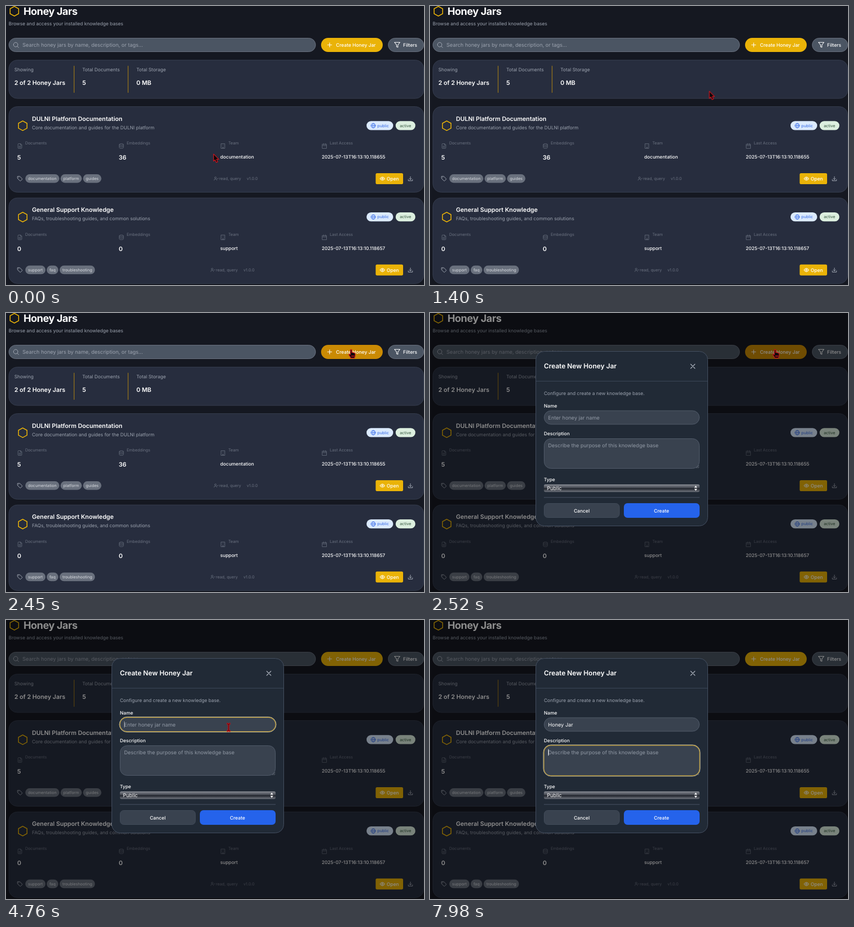
Animation, 800 px wide and 534 px high, one loop 8000 ms. Source, as an HTML page:

```html
<!DOCTYPE html>
<html lang="en">
<head>
<meta charset="utf-8">
<title>Honey Jars</title>
<style>
html, body { margin: 0; width: 100%; height: 100%; overflow: hidden; background: #151821; }
svg { position: absolute; left: 0; top: 0; overflow: visible; }
text, #typed { font-family: Inter, Roboto, sans-serif; text-rendering: geometricPrecision; white-space: pre; }
text { fill: #fff; font-size: 9px; }
.xs { font-size: 7.7px; }
.md { font-size: 9.85px; }
.lg { font-size: 11.5px; font-weight: 600; }
.h1 { font-size: 19.5px; font-weight: 700; letter-spacing: -.48px; }
.h2 { font-size: 12.85px; font-weight: 600; }
.btn { font-size: 9.15px; font-weight: 500; }
.mid { font-weight: 500; }
.soft { fill: #9ca3af; }
.dim { fill: #6b7280; }
.hint { fill: #929aa6; }
.tag { fill: #d8dbe0; }
.center { text-anchor: middle; }
.panel { fill: #272d3e; stroke: #363d4e; }
.pill { fill: #69707d; }
.field { fill: #4b5563; stroke: #6b7280; }
.input { fill: #39424f; stroke: #525c6b; }
.gold { fill: #eab308; }
.icon { fill: none; stroke-linecap: round; stroke-linejoin: round; }
.hex { stroke: #eab308; stroke-width: 1.6; }
.line { stroke: #646b7a; stroke-width: .9; }
.pale { stroke: #a7adb8; stroke-width: 1; }
.white { stroke: #fff; stroke-width: 1.1; }
.halo { fill: none; stroke: #a9b2c0; stroke-width: 1; }
.ring { fill: none; stroke: #d0a730; stroke-width: 1.2; }

#page, #modal, #typed, #typed::before, #typed::after, #hint, .focus, .cursor, #move, #create {
  animation: 8s step-end infinite;
}
#page { animation-name: dim; }
#modal { animation-name: open; }
#create { animation-name: hover; animation-timing-function: linear; }
#move { animation-name: move; }
#arrow { animation-name: arrow; }
#hand { animation-name: hand; }
#beam { animation-name: beam; }
#hint { animation-name: hint; }
#nameFocus { animation-name: nameFocus; }
#textFocus { animation-name: textFocus; }

#typed { position: absolute; left: 226px; top: 193.5px; height: 14px; line-height: 14px; font-size: 9.85px; color: #fff; }
#typed::before { content: ""; animation-name: type; }
#typed::after {
  content: ""; display: inline-block; width: 1.1px; height: 12px; margin-left: .2px;
  vertical-align: -2.2px; background: #fff; opacity: 0; animation-name: blink;
}

@keyframes dim {
  0% { filter: none; }
  31.5%, 100% { filter: brightness(.55); }
}
@keyframes open { 0% { visibility: hidden; } 31.5%, 100% { visibility: visible; } }
@keyframes hover {
  0%, 24.375% { fill: #eab308; }
  26.875%, 32.375% { fill: #ca8a04; }
  33.25%, 100% { fill: #eab308; }
}
@keyframes move {
  0%, 10.5% { transform: translate(397px, 283px); animation-timing-function: cubic-bezier(.4, .1, .8, .8); }
  17.5% { transform: translate(534px, 163px); animation-timing-function: cubic-bezier(.2, .4, .4, 1); }
  27.125%, 37.625% { transform: translate(660.5px, 71px); animation-timing-function: cubic-bezier(.4, 0, .45, 1); }
  47.25%, 100% { transform: translate(426px, 205.5px); }
}
@keyframes arrow {
  0% { visibility: visible; }
  24.375% { visibility: hidden; }
  32.375% { visibility: visible; }
  44.5%, 100% { visibility: hidden; }
}
@keyframes hand { 0% { visibility: hidden; } 24.375% { visibility: visible; } 32.375%, 100% { visibility: hidden; } }
@keyframes beam { 0% { visibility: hidden; } 44.5% { visibility: visible; } 67.375%, 100% { visibility: hidden; } }
@keyframes hint { 0% { opacity: 1; } 67.375%, 100% { opacity: 0; } }
@keyframes nameFocus { 0% { opacity: 0; } 51.625% { opacity: 1; } 99.75%, 100% { opacity: 0; } }
@keyframes textFocus { 0% { opacity: 0; } 99.75%, 100% { opacity: 1; } }
@keyframes type {
  0% { content: ""; }
  67.375% { content: "H"; }
  70% { content: "Ho"; }
  71.75% { content: "Hon"; }
  74.375% { content: "Hone"; }
  77.875% { content: "Honey"; }
  80.5% { content: "Honey "; }
  90.125% { content: "Honey J"; }
  92.75% { content: "Honey Ja"; }
  96.25%, 100% { content: "Honey Jar"; }
}
@keyframes blink {
  0% { opacity: 0; }
  51.625% { opacity: 1; }
  59.5% { opacity: .5; }
  60.375% { opacity: 0; }
  63.875% { opacity: .3; }
  64.75% { opacity: .65; }
  65.625% { opacity: 1; }
  87.5% { opacity: .5; }
  88.375% { opacity: 0; }
  90.125% { opacity: 1; }
  99.75%, 100% { opacity: 0; }
}
</style>
</head>
<body>
<svg id="page" width="800" height="534" viewBox="0 0 800 534">
  <defs>
    <path id="hex" class="icon hex" d="M0-9.2 8.2-4.7V4.7L0 9.2-8.2 4.7V-4.7Z"/>
    <path id="doc" class="icon line" d="M1-4.5H-2.6Q-3.6-4.5-3.6-3.5V3.5Q-3.6 4.5-2.6 4.5H2.6Q3.6 4.5 3.6 3.5V-2ZL1-2H3.6M-1.8 .3H1.8M-1.8 2.3H1.8"/>
    <path id="base" class="icon line" d="M-4-3A4 1.5 0 0 1 4-3 4 1.5 0 0 1-4-3V3A4 1.5 0 0 0 4 3V-3M-4 0A4 1.5 0 0 0 4 0"/>
    <path id="house" class="icon line" d="M-3.5-4.5H3.5V4.5H-3.5ZM-1 4.5V2.5H1V4.5M-1.5-2.5H-1.4M1.4-2.5H1.5M-1.5 0H-1.4M1.4 0H1.5"/>
    <path id="day" class="icon line" d="M-4-3.4H4V4.5H-4ZM-4-.8H4M-1.8-4.8V-2.4M1.8-4.8V-2.4"/>
    <path id="label" class="icon pale" d="M-4.2-4.2H-.2L4.2 .2Q4.8 .9 4.2 1.5L1.4 4.3Q.8 4.8 .1 4.3L-4.2 0ZM-2.2-2.2H-2.1"/>
    <path id="user" class="icon line" d="M-3.8 3.2Q-3.8 .8-1 .8T1.6 3.2M-2.7-1.6A1.6 1.6 0 0 1 .5-1.6 1.6 1.6 0 0 1-2.7-1.6M2 0 2.9 .9 4.3-.7"/>
    <path id="save" class="icon pale" d="M0-4V1.8M-2.2-.4 0 1.8 2.2-.4M-4 1.5V4H4V1.5"/>
    <g id="eye" class="icon white"><path d="M-4.5 0Q0-6.6 4.5 0 0 6.6-4.5 0Z"/><circle r="1.4"/></g>
    <g id="globe" class="icon" stroke="#3b6fe8" stroke-width=".9"><circle r="4.4"/><ellipse rx="1.9" ry="4.4"/><path d="M-4.4 0H4.4"/></g>
  </defs>
  <rect width="800" height="534" fill="#151821"/>
  <use href="#hex" x="16" y="10"/>
  <text class="h1" x="33.5" y="17">Honey Jars</text>
  <text class="soft" x="5" y="37.2">Browse and access your installed knowledge bases</text>

  <rect class="field" x="5.5" y="61.5" width="587" height="26" rx="13"/>
  <path class="icon pale" d="M14.3 74A4.2 4.2 0 0 1 22.7 74 4.2 4.2 0 0 1 14.3 74M21.5 77 24.3 79.8"/>
  <text class="md soft" x="31.5" y="78.4">Search honey jars by name, description, or tags...</text>
  <rect id="create" x="603" y="61" width="118" height="27" rx="13.5"/>
  <path class="icon white" d="M615.5 74.5H623.5M619.5 70.5V78.5"/>
  <text class="btn" x="631.5" y="78">Create Honey Jar</text>
  <rect class="field" x="731.5" y="61.5" width="68" height="26" rx="13"/>
  <path class="icon white" d="M743.5 69.5H754L750 74.5V79L747.5 78V74.5Z"/>
  <text class="btn" x="760" y="78">Filters</text>

  <rect class="panel" x="5.5" y="103.5" width="794" height="73.5" rx="16"/>
  <path stroke="#b98a12" d="M130.3 114.5V166M233.7 114.5V166"/>
  <text class="soft" x="16" y="125">Showing</text>
  <text class="lg" x="16" y="151.2">2 of 2 Honey Jars</text>
  <text class="soft" x="146" y="125">Total Documents</text>
  <text class="lg" x="146" y="151.2">5</text>
  <text class="soft" x="249.5" y="125">Total Storage</text>
  <text class="lg" x="249.5" y="151.2">0 MB</text>
  <g id="cards"></g>
</svg>

<div id="modal">
  <svg width="800" height="534" viewBox="0 0 800 534">
    <defs>
      <linearGradient id="metal" x2="0" y2="1">
        <stop stop-color="#858991"/><stop offset=".42" stop-color="#4b4f58"/>
        <stop offset=".55" stop-color="#20242c"/><stop offset="1" stop-color="#747881"/>
      </linearGradient>
    </defs>
    <rect x="202.5" y="73.5" width="329" height="334" rx="16" fill="#212a36" stroke="#465163"/>
    <path stroke="#3c4859" d="M203 130.5H531"/>
    <path stroke="#4a5566" d="M218 353H516"/>
    <text class="h2" x="218" y="106.2">Create New Honey Jar</text>
    <path class="icon" stroke="#b4bac5" stroke-width="1.2" d="M499 98 507 106M507 98 499 106"/>
    <text class="soft" x="218" y="157">Configure and create a new knowledge base.</text>
    <text class="mid" x="218" y="180.5">Name</text>
    <rect class="input" x="218.5" y="187" width="297" height="26" rx="13"/>
    <text id="hint" class="md hint" x="226" y="203.8">Enter honey jar name</text>
    <text class="mid" x="218" y="234.2">Description</text>
    <rect class="input" x="218.5" y="240.5" width="297" height="57" rx="13"/>
    <text class="md hint" x="226" y="257.3">Describe the purpose of this knowledge base</text>
    <path stroke="#9aa1ac" stroke-width=".7" d="M509.5 297 515 291.5M512.5 297 515 294.5"/>
    <text class="mid" x="218" y="321.8">Type</text>
    <rect x="218" y="328" width="298" height="14.5" rx="3" fill="url(#metal)"/>
    <text class="md" x="223.7" y="338.8">Public</text>
    <path fill="#fff" d="M505.8 334.2 508.6 330.4 511.4 334.2ZM505.8 336.4 508.6 340.2 511.4 336.4Z"/>
    <rect x="218.5" y="364.5" width="144" height="27" rx="7" fill="#39424f" stroke="#424c5a"/>
    <text class="btn center" x="290.3" y="381.6">Cancel</text>
    <rect x="371" y="364" width="145" height="28" rx="7" fill="#2563eb"/>
    <text class="btn center" x="443" y="381.6">Create</text>
    <g id="nameFocus" class="focus">
      <rect class="halo" x="216.9" y="185.4" width="300.2" height="29.2" rx="14.6"/>
      <rect class="ring" x="217.9" y="186.4" width="298.2" height="27.2" rx="13.6"/>
    </g>
    <g id="textFocus" class="focus">
      <rect class="halo" x="216.9" y="238.9" width="300.2" height="60.2" rx="14.6"/>
      <rect class="ring" x="217.9" y="239.9" width="298.2" height="58.2" rx="13.6"/>
      <rect x="226.2" y="247.5" width="1.1" height="12" fill="#fff"/>
    </g>
  </svg>
  <div id="typed"></div>
</div>

<svg width="800" height="534" viewBox="0 0 800 534">
  <g id="move" fill="#08090c" stroke="#d8141c" stroke-width="1.2" stroke-linejoin="round">
    <path id="arrow" class="cursor" d="M.3 .3V14L3.2 11.4 5.5 16.4 8.2 15.2 5.9 10.3H10.2Z"/>
    <path id="hand" class="cursor" d="M-1.3-.3Q0-1.8 1.3-.3V4.6Q2.5 3.8 3.6 5 4.8 4.4 5.8 5.6 7.4 5.2 7.7 7V10.5Q7.2 13 6.3 15.4H-.8Q-1.4 12.8-3.8 9.8-4.6 7.8-3 7.7-2 7.8-1.3 9ZM1.2 10V13M3.2 10V13M5.2 10V13"/>
    <g id="beam" class="cursor" fill="none">
      <path stroke-width="3" d="M-3.5-7Q-.2-7 0-5 .2-7 3.5-7M0-5V5M-3.5 7Q-.2 7 0 5 .2 7 3.5 7"/>
      <path stroke="#240407" stroke-width=".9" d="M-3-7Q-.2-7 0-5 .2-7 3-7M0-5V5M-3 7Q-.2 7 0 5 .2 7 3 7"/>
    </g>
  </g>
</svg>

<script>
const text = (cls, x, y, str) => `<text class="${cls}" x="${x}" y="${y}">${str}</text>`;
const use = (id, x, y) => `<use href="#${id}" x="${x}" y="${y}"/>`;
const box = (cls, x, y, w, h, r) => `<rect class="${cls}" x="${x}" y="${y}" width="${w}" height="${h}" rx="${r}"/>`;

// Coordinates inside a card are those of the first one.
function card(c) {
  const tags = c.tags.map(([x, w, name]) =>
    box('pill', x, 322, w, 16.5, 8.25) + text('xs tag center', x + w / 2, 332.8, name));
  return `<g transform="translate(0 ${c.dy})">
    ${box('panel', 5.5, 192.5, 794, 164, 16)}
    ${use('hex', 32, 229.2)}
    ${text('lg', 49.7, 219.6, c.title)}
    ${text('soft', 49.7, 235.6, c.about)}
    <rect x="690" y="220.3" width="51" height="17.2" rx="8.6" fill="#dbeafe"/>
    ${use('globe', 703, 229)}
    <text class="xs" x="710.8" y="231.6" style="fill:#2f66e4">public</text>
    <rect x="745.7" y="220.3" width="37.8" height="17.2" rx="8.6" fill="#dcefdf"/>
    <text class="xs center" x="764.6" y="231.6" style="fill:#35573f">active</text>
    ${use('doc', 26.6, 268)}${use('base', 220.8, 268)}${use('house', 415.3, 268)}${use('day', 609.5, 268)}
    ${text('xs dim', 36.7, 265.4, 'Documents')}
    ${text('xs dim', 231, 265.4, 'Embeddings')}
    ${text('xs dim', 425.5, 265.4, 'Team')}
    ${text('xs dim', 619.7, 265.4, 'Last Access')}
    ${text('lg', 21.5, 294.2, c.docs)}
    ${text('lg', 215.7, 294.2, c.parts)}
    ${text('mid', 410, 291.8, c.team)}
    ${text('mid', 604.2, 291.8, c.last)}
    ${use('label', 26.6, 330.3)}${tags.join('')}
    ${use('user', c.access - 6, 330.2)}
    ${text('xs dim', c.access, 332.9, 'read, query')}
    ${text('xs dim', c.access + 52.8, 332.9, 'v1.0.0')}
    ${box('gold', 707.5, 320, 52.5, 21, 2.8)}
    ${use('eye', 720.4, 330.5)}
    ${text('btn', 728.5, 333.8, 'Open')}
    ${use('save', 774, 330.5)}
  </g>`;
}

document.getElementById('cards').innerHTML = [
  { dy: 0, title: 'DULNI Platform Documentation', about: 'Core documentation and guides for the DULNI platform',
    docs: 5, parts: 36, team: 'documentation', last: '2025-07-13T16:13:10.118655', access: 408,
    tags: [[37, 65, 'documentation'], [104.5, 40.5, 'platform'], [147.5, 35, 'guides']] },
  { dy: 174.8, title: 'General Support Knowledge', about: 'FAQs, troubleshooting guides, and common solutions',
    docs: 0, parts: 0, team: 'support', last: '2025-07-13T16:13:10.118657', access: 401.7,
    tags: [[37, 38.5, 'support'], [78, 22, 'faq'], [102.7, 67.5, 'troubleshooting']] }
].map(card).join('');
</script>
</body>
</html>
```
